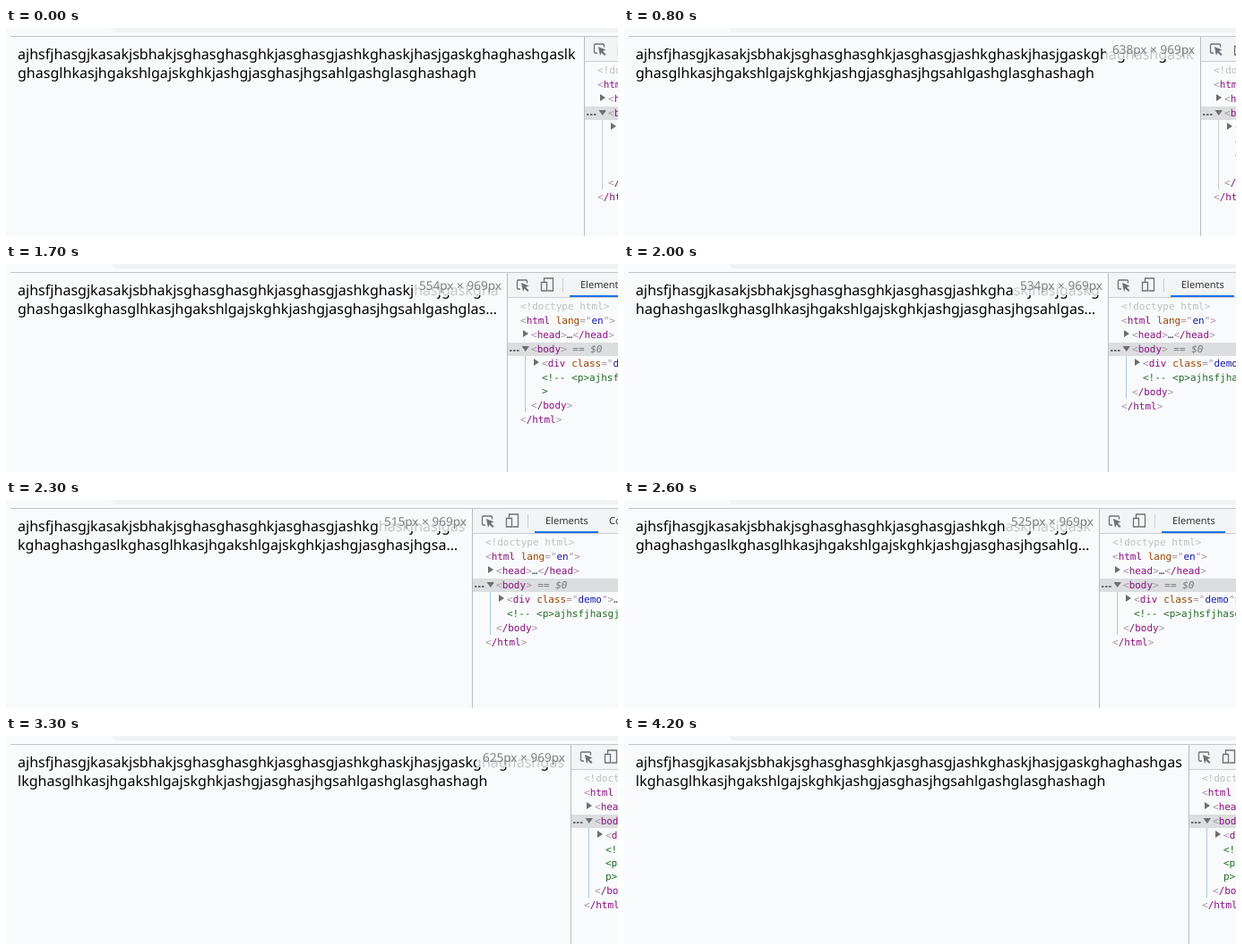
Write an HTML page that moves like this. It is 683 px wide and 233 px high and loops after 5500 ms.

```html
<!DOCTYPE html>
<html lang="en">
<head>
<meta charset="utf-8">
<style>
html, body { margin: 0; width: 100%; height: 100%; overflow: hidden; background: #f9fafc; }
div, svg { position: absolute; }
#strip { left: 118px; top: 0; right: 0; height: 5px; background: #f1f2f4; border-radius: 0 0 0 5px; }
#rule { left: 5px; top: 9px; right: 0; height: 1px; background: #c3c5c8; }
#text {
  left: 13px; top: 19px; font: 16px/21px "Noto Sans", sans-serif; color: #000;
  letter-spacing: .03px; text-rendering: geometricPrecision; word-break: break-all;
  display: -webkit-box; -webkit-box-orient: vertical; -webkit-line-clamp: 2; overflow: hidden;
}
#size {
  top: 10px; height: 25px; padding: 0 5px 0 7px; font: 13.6px/27px "Noto Sans", sans-serif;
  color: #808080; background: rgba(249,250,252,.8); white-space: pre; text-rendering: geometricPrecision;
}
#panel { top: 10px; bottom: 0; right: 0; overflow: hidden; background: #f9fafc; border-left: 1px solid #babcc0; }
#bar { left: 0; right: 0; top: 0; height: 27px; background: #f3f4f6; border-bottom: 1px solid #ccc; }
.tab { top: 6px; font: 11px/16px "Noto Sans", sans-serif; color: #333; text-rendering: geometricPrecision; }
#under { left: 69px; top: 25px; width: 71px; height: 2px; background: #1a73e8; }
#sel { left: 0; right: 0; top: 78px; height: 15px; background: #dcdddf; }
#guide { left: 19px; top: 93px; width: 1px; }
.row { font: 11px/16px "DejaVu Sans Mono", monospace; white-space: pre; color: #a894a6; text-rendering: geometricPrecision; }
.row b { font-weight: 400; color: #881280; }
.row u { text-decoration: none; color: #994500; }
.row s { text-decoration: none; color: #1a1aa6; }
.row q { quotes: none; color: #236e25; }
.row i { color: #777; }
.row em { font-style: normal; color: #c0c0c0; }
.row span { color: #444; }
</style>
</head>
<body>
<div id="strip"></div>
<div id="rule"></div>
<div id="text">ajhsfjhasgjkasakjsbhakjsghasghasghkjasghasgjashkghaskjhasjgaskghaghashgaslkghasglhkasjhgakshlgajskghkjashgjasghasjhgsahlgashglasghashagh</div>
<div id="size"></div>
<div id="panel">
  <div id="bar">
    <svg width="66" height="27" fill="none" stroke="#6e7175" stroke-width="1.3">
      <path d="M14 18h-2.500q-1 0-1-1v-8q0-1 1-1h9q1 0 1 1v2.500"/>
      <path d="M15 11l8.500 3.500-3.500 1.500 3.500 3.500-1.500 1.500-3.500-3.500-1.500 3.500z" fill="#6e7175" stroke="none"/>
      <path d="M40.500 10v-4h10v14h-6M37.500 10.500h6v9.500h-6z"/>
      <path d="M61.500 6v15" stroke="#ccc" stroke-width="1"/>
    </svg>
    <div class="tab" style="left:81px">Elements</div>
    <div class="tab" style="left:152px">Console</div>
    <div id="under"></div>
  </div>
  <div id="sel"></div>
  <div id="guide"></div>
  <div id="rows"></div>
  <svg width="40" height="120" fill="#6e6e6e">
    <path d="M17 64l6 4-6 4zM15.500 82h8.500l-4.250 6zM29 96l6 4-6 4z"/>
    <path d="M2 86h2.500v2h-2.500zM6 86h2.500v2h-2.500zM10 86h2.500v2h-2.500z"/>
  </svg>
</div>
<script>
const $ = id => document.getElementById(id);
const STAGE = 683, LOOP = 5500, STEP = 100;
// time in ms, page width in px
const keys = [[700, 640], [800, 638], [1000, 620], [1100, 620], [1300, 585], [1700, 554], [2300, 515],
  [2400, 514], [2500, 514], [2600, 525], [2900, 586.8], [3100, 612], [3300, 625], [LOOP, 625]];

function widthAt(t) {
  if (t < keys[0][0]) return keys[0][1];
  const n = keys.findIndex(k => k[0] > t);
  const [t0, w0] = keys[n - 1], [t1, w1] = keys[n];
  return w0 + (w1 - w0) * (t - t0) / (t1 - t0);
}

const tag = (name, rest = "") => `&lt;<b>${name}</b>${rest}&gt;`;
const attr = (name, value) => ` <u>${name}</u>="<s>${value}</s>"`;
const note = s => [38, `<q>${s.replace(/</g, "&lt;")}</q>`];
const dots = "<span>…</span>";

// The comment wraps onto more rows as the panel narrows
function comment(w) {
  if (w > 140) return [note("<!-- <p>ajhsfjhasgjkasakjsbhakjs")];
  if (w > 105) return [note("<!-- <p>ajhsfjhasg"), note(">")];
  if (w > 92) return [note("<!--"), note("<p>ajhsfjhasg")];
  return [note("<!--"), note("<p>ajhsfjhasg"), note(w < 60 ? "p>" : ">")];
}

const tree = w => [
  [14, "<em>&lt;!doctype html&gt;</em>"],
  [14, tag("html", attr("lang", "en"))],
  [26, tag("head") + dots + tag("/head")],
  [26, tag("body") + "<i> == $0</i>"],
  [38, tag("div", attr("class", "demo")) + dots + tag("/div")],
  ...comment(w),
  [26, tag("/body")],
  [14, tag("/html")]
];

let last = -1;
function frame(now) {
  const t = Math.floor(now % LOOP / STEP) * STEP;
  if (t !== last) draw(last = t);
  requestAnimationFrame(frame);
}

function draw(t) {
  const width = widthAt(t), edge = Math.round(width + 5), rows = tree(STAGE - edge);
  // Wrapped lines inside the comment are 15px apart, all others 16px
  const wraps = rows.length - 8;
  const rowTop = i => 30 + i * 16 - Math.min(Math.max(i - 5, 0), wraps);
  $("text").style.width = width - 15 + "px";
  $("size").textContent = `${Math.floor(width)}px × 969px`;
  $("size").style.right = STAGE - edge + 1 + "px";
  $("size").style.display = t >= 800 && t < 4200 ? "" : "none";
  $("panel").style.left = edge + "px";
  $("guide").style.height = rowTop(rows.length - 1) - 94 + "px";
  $("guide").style.background = t < 900 ? "#ccc" : "#a9c8ee";
  $("rows").innerHTML = rows.map(([x, html], i) =>
    `<div class="row" style="left:${x}px;top:${rowTop(i)}px">${html}</div>`).join("");
}

draw(0);
requestAnimationFrame(frame);
</script>
</body>
</html>
```
